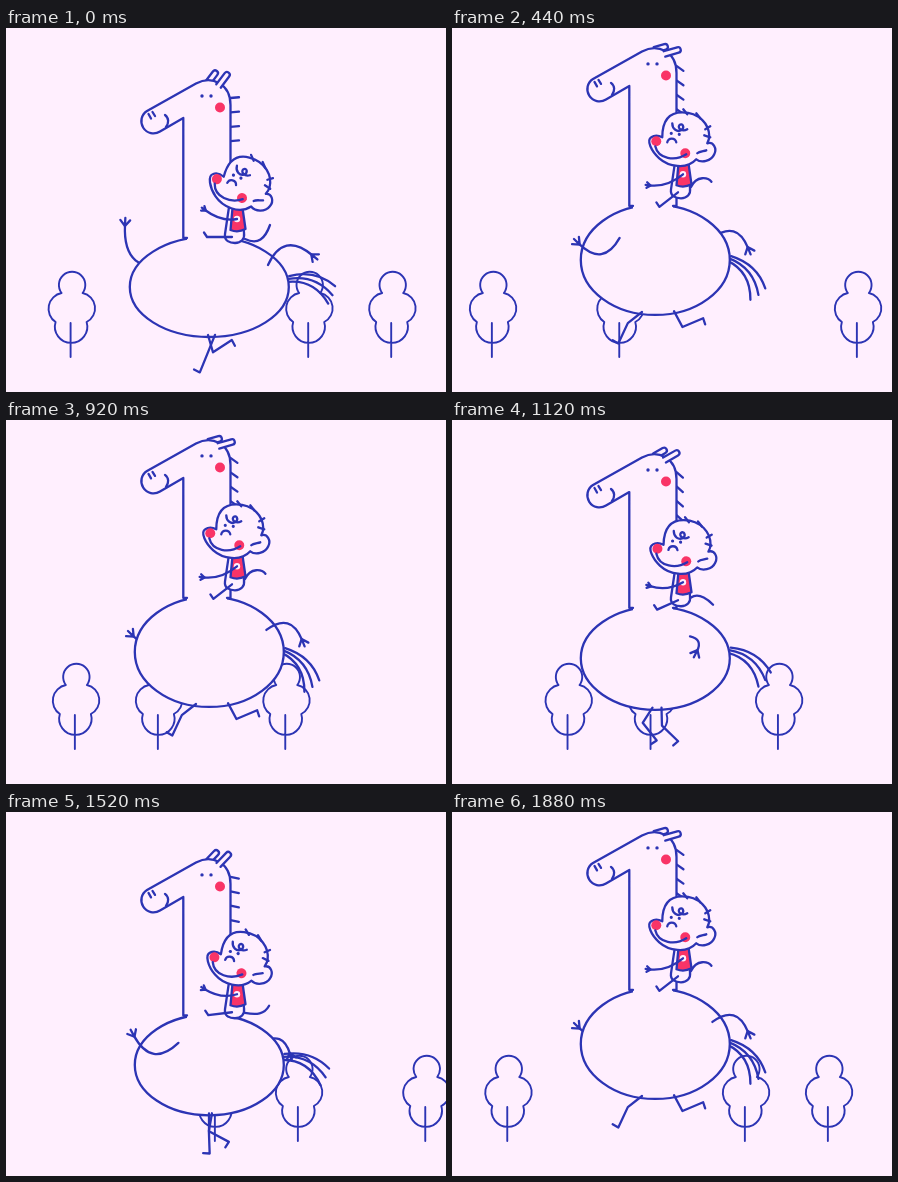
An HTML page with a canvas that plays this animation: 440x364 px, repeating every 1.92 s.

```html
<!DOCTYPE html>
<html lang="en">
<head>
<meta charset="utf-8">
<title>Monkey ride</title>
<style>
html, body { margin: 0; width: 100%; height: 100%; overflow: hidden; background: #ffeffe; }
canvas { display: block; width: 440px; height: 364px; }
</style>
</head>
<body>
<canvas id="stage"></canvas>
<script>
const W = 440, H = 364, LOOP = 1920, STEP = 40, STRIDE = 960, BOUNCE = 480;
const TREE_SPAN = 448, MID = 203.3;
const PAPER = '#ffeffe', INK = '#2c34b4', RED = '#f93467';

const canvas = document.getElementById('stage');
const ctx = canvas.getContext('2d');
const dpr = window.devicePixelRatio || 1;
canvas.width = W * dpr;
canvas.height = H * dpr;

// One stride of a hand: time, x, y from the body centre
const handPath = [
  [0, 306, -32], [80, 284, -11], [320, 167, 0], [440, 127, -16],
  [480, 119, -62], [560, 128, -29], [720, 241, 16], [920, 296, -12]
];
// One stride of a leg: time, hip x, thigh angle, shin angle
const legSwing = [
  [0, 209, 112, 112], [80, 206, 100, 88], [240, 213, 77, 0], [320, 238, 36, -50],
  [440, 222, 62, -23], [480, 202, 74, -33], [560, 203, 90, 28], [720, 198, 156, 75],
  [800, 147, 193, 107], [920, 190, 142, 115]
];

function pose(track, time) {
  const t = time % STRIDE;
  const i = track.findLastIndex(key => key[0] <= t);
  const a = track[i], b = track[(i + 1) % track.length];
  const k = (t - a[0]) / ((b[0] || STRIDE) - a[0]);
  return a.slice(1).map((v, j) => v + (b[j + 1] - v) * k);
}

const rad = degrees => degrees * Math.PI / 180;
const fallTime = p => Math.max(0, (p - 0.75) / 0.25);

// Height of a bounce, 0 to 1: eased up until `rise`, dropping late and hard
function hop(p, rise, power = 3.3) {
  const up = (1 - Math.cos(Math.PI * Math.min(1, p / rise))) / 2;
  return up * (1 - fallTime(p) ** power);
}

function draw(d, fill) {
  const path = new Path2D(d);
  if (fill) { ctx.fillStyle = fill; ctx.fill(path); }
  ctx.strokeStyle = INK;
  ctx.stroke(path);
}

function dot(x, y, r, color) {
  ctx.fillStyle = color;
  ctx.beginPath();
  ctx.arc(x, y, r, 0, Math.PI * 2);
  ctx.fill();
}

function at(x, y, degrees, paint) {
  ctx.save();
  ctx.translate(x, y);
  ctx.rotate(rad(degrees));
  paint();
  ctx.restore();
}

function tree(x) {
  at(x, 0, 0, () => draw('M-9 265A13.2 13.2 0 1 1 12 265A15.5 15.5 0 0 1 16 294' +
    'A16.2 16.2 0 1 1 -15 294A16 16 0 0 1 -9 265ZM0 295V329'));
}

function trees(t) {
  ctx.lineWidth = 1.9;
  for (const start of [64.6, 302.2, 385.2]) {
    const x = (start + t * TREE_SPAN / LOOP) % TREE_SPAN;
    tree(x);
    tree(x - TREE_SPAN);
  }
}

// Curved limb ending in three fingers
function reach(x, y, bendX, bendY, handX, handY, size) {
  draw(`M${x} ${y}Q${bendX} ${bendY} ${handX} ${handY}`);
  const aim = Math.atan2(handY - bendY, handX - bendX) * 180 / Math.PI;
  at(handX, handY, aim, () =>
    draw(`M0 0H${size}M-1 0L${size * 0.7} ${-size * 0.7}M-1 0L${size * 0.7} ${size * 0.7}`));
}

function arm(t) {
  const [handX, handY] = pose(handPath, t);
  const x = 214 + 48 * Math.cos(2 * Math.PI * t / STRIDE), y = -22;
  const dx = handX - x, dy = handY - y;
  reach(x, y, x + dx / 2 + 0.65 * dy, y + dy / 2 - 0.65 * dx, handX, handY, 7);
}

function leg(t, rx, ry) {
  const [hip, thigh, shin] = pose(legSwing, t);
  let x = hip, y = ry * Math.sqrt(1 - ((hip - MID) / rx) ** 2) - 2;
  let d = `M${x} ${y}`;
  for (const [angle, length] of [[thigh, 18], [shin, 22.5], [shin + 95, 6.5]]) {
    x += length * Math.cos(rad(angle));
    y += length * Math.sin(rad(angle));
    d += `L${x} ${y}`;
  }
  draw(d);
}

function tail(x, y, angle) {
  at(x, y, angle, () => {
    for (let i = 0; i < 3; i++) {
      const a = rad(i * 11.5);
      draw(`M0 ${i * 3 - 2}Q25 ${i * 5 - 13} ${47 * Math.cos(a)} ${47 * Math.sin(a)}`);
    }
  });
}

function ear(x, y, angle, length) {
  at(x, y, angle, () => draw(`M0 -2.8H${length}a2.8 2.8 0 0 1 0 5.6H0`, PAPER));
}

function neck(p, base) {
  const lift = -43.5 * hop(p, 0.75), b = base - lift;
  const earAngle = 50 * hop(p, 0.7) - 53;
  const maneAngle = 55 * hop(p, 0.45) - 5;
  at(0, lift, 0, () => {
    ear(202.5, 54, earAngle, 11);
    for (let i = 0; i < 4; i++) {
      at(224.5, 70 + i * 14.4, maneAngle, () => draw('M0 0H8.5'));
    }
    ctx.fillStyle = PAPER;
    ctx.fillRect(181, b - 3, 40, 8);
    draw(`M181 ${b}H177.3V90L154 103.5A12 12 0 0 1 141 83L190 55.5` +
      `C206 47 224.5 56 224.5 77V${b}H221`, PAPER);
    ear(212.5, 58, earAngle, 14);
    draw('M142.5 86L145 90.5M146.5 84L149 88M159 87C163 90 163 95 160 99');
    dot(196, 68, 1.7, INK);
    dot(205, 68, 1.7, INK);
    dot(214, 79.5, 5, RED);
  });
}

function face() {
  draw('M-23 -16C-23 -30 -18 -41 -3 -41C14 -41 24 -29 24 -17C24 -14 23 -12 22 -10' +
    'C28 -12 32 -5 29 1C26 8 16 10 11 6C1 17 -17 13 -26 5C-34 -2 -39 -13 -34 -16' +
    'C-31 -18 -27 -18 -23 -16Z', PAPER);
  dot(-29, -12, 5, RED);
  dot(0, 0, 5, RED);
  draw('M-30 -7C-27 6 -10 8 1 1M12 0C14 -2 18 -2 21 -3');
  draw('M-13 -30C-13 -24 -8 -21 -4 -23C0 -26 -3 -31 -6 -28C-8 -25 -3 -21 2 -24');
  draw('M-18 -11C-17 -16 -10 -16 -9 -11');
  draw('M-2 -44L2 -39M11 -40L15 -35M20 -24L25 -27M19 -18L25 -16');
  dot(-14, -20, 1.6, INK);
  dot(-6, -19, 1.6, INK);
}

function rider(p) {
  const up = hop(p, 0.6, 6), seat = 215 - 49 * up;
  const wag = -7 - 11 * Math.cos(2 * Math.PI * p);
  at(0, seat, 0, () => {
    draw(`M239 ${-4 - 8 * up}C${252 - 8 * up} ${2 - 28 * up} ` +
      `${259 - 3 * up} ${-4 - 22 * hop(p, 0.75, 6) ** 3} ${264 - 5 * up} ${wag}`);
    draw('M223 -36L219 -9C218 -2 224 0 229 0C235 0 239 -4 238 -10L236 -36', PAPER);
    draw('M226.5 -35H236.5L239.5 -14Q232 -10 224.5 -13Z', RED);
    dot(231, -24, 3.2, PAPER);
    draw(`M226 -6L${201 + 7 * up} ${16 * up - 6}l-3 -4.5`);
    reach(231, -24, 215, 11 * up - 21, 199 - 1.5 * up, 22 * up - 33, 4);
  });
  at(236 - 3 * up, seat - 45, 14.5 * (1 - up) ** 3, face);
}

function render(t) {
  ctx.setTransform(dpr, 0, 0, dpr, 0, 0);
  ctx.fillStyle = PAPER;
  ctx.fillRect(0, 0, W, H);
  ctx.lineCap = ctx.lineJoin = 'round';
  trees(t);

  const p = t % BOUNCE / BOUNCE;
  const stretch = 2 * Math.sin(Math.PI * Math.min(1, p / 0.66) ** 2)
    + (p < 1 ? 7.5 * fallTime(p) : 0);
  const rx = 74.5 + 5 * Math.max(0, 1 - p * 6), ry = 50 + stretch;
  const top = 209 - 43.5 * hop(p, 0.66), cy = top + ry;
  const onBody = paint => at(0, cy, 0, paint);

  ctx.lineWidth = 2.3;
  tail(MID + rx, cy - 9 + 10 * fallTime(p), 10 + 42 * hop(p, 0.7));
  onBody(() => arm(t + STRIDE / 2));
  onBody(() => draw(`M${MID - rx} 0a${rx} ${ry} 0 1 1 ${2 * rx} 0a${rx} ${ry} 0 1 1 ${-2 * rx} 0Z`, PAPER));
  neck(p, top + 1);
  onBody(() => {
    leg(t + STRIDE / 2, rx, ry);
    leg(t, rx, ry);
    arm(t);
  });
  rider(p);
}

const begin = performance.now();
function tick() {
  const t = (performance.now() - begin) % LOOP;
  render(Math.floor(t / STEP) * STEP);
  requestAnimationFrame(tick);
}
tick();
</script>
</body>
</html>
```
